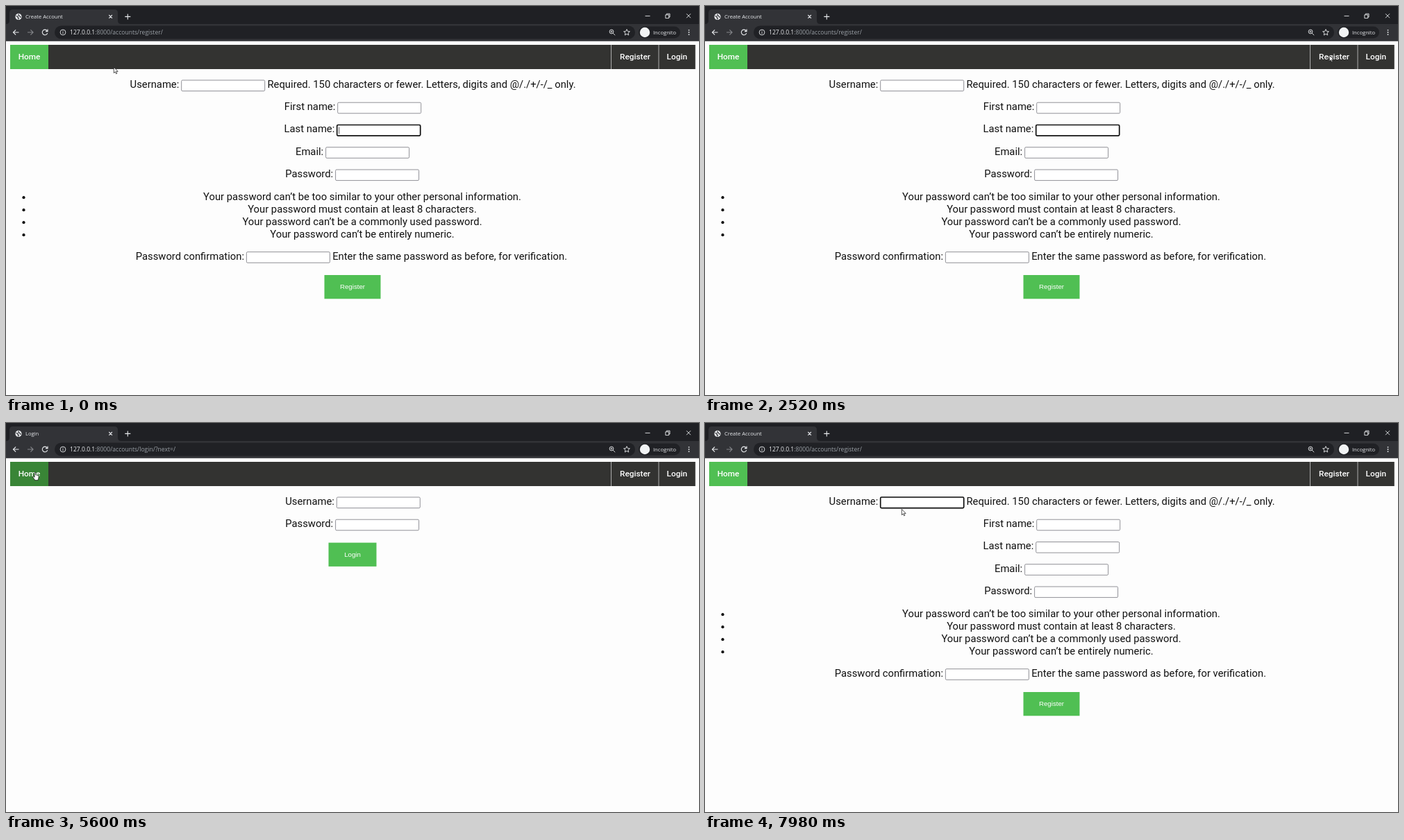
An HTML page that plays this animation: 998x561 px, repeating every 8000 ms.

```html
<!DOCTYPE html>
<html lang="en">
<head>
<meta charset="utf-8">
<title>Create Account</title>
<style>
  html, body { margin: 0; width: 100%; height: 100%; overflow: hidden; background: #fdfdfd; }
  svg { display: block; width: 100vw; height: 100vh; }
  text { white-space: pre; }
  .ui { font: 7.6px "Open Sans", "Noto Sans", sans-serif; fill: #e8eaed; }
  .url { font-size: 8.58px; }
  .body { font: 14.8px Roboto, sans-serif; fill: #111; }
  .nav { font: 500 11.8px Roboto, sans-serif; fill: #fff; text-anchor: middle; }
  .btn { font: 9.67px "Liberation Sans", Arial, sans-serif; fill: #fff; text-anchor: middle; }
  .mid { text-anchor: middle; }
  .end { text-anchor: end; }
  .line { fill: none; stroke: #e8eaed; stroke-width: 1.1; }
  .dim { stroke: #85878b; }
</style>
</head>
<body>
<svg id="stage" viewBox="0 0 998 561" preserveAspectRatio="none">
  <rect width="998" height="561" fill="#fdfdfd"/>

  <!-- browser window -->
  <rect width="998" height="50.5" fill="#1f2024"/>
  <rect y="26" width="998" height="24.5" fill="#323337"/>
  <path d="M0 26q5 0 5-5V10q0-5 5-5H156q5 0 5 5V21q0 5 5 5z" fill="#323337"/>
  <g id="globe">
    <circle r="4.6" fill="#e8eaed"/>
    <path d="M-3.5-1.2L-.6.2-1 1.6.4 2.6-.6 4M.2-3.9L-.2-2 1.6-1.2 2.6.6 3.8.4" fill="none" stroke="#323337" stroke-width="1.2"/>
  </g>
  <text id="title" class="ui" x="28" y="18"></text>
  <path class="line" d="M148.3 13l4.6 4.6m0-4.6l-4.6 4.6M171.3 15.4h8m-4-4v8"/>
  <path class="line" d="M920.5 14.4h7M949.8 12.8h4.8v4.8h-4.8zM951.2 12.6v-1.4H956v4.8h-1.2M980 11.2l6 6m0-6l-6 6" style="stroke-width:.9"/>
  <path class="line" d="M18.5 38h-8m3.6-3.7L10.4 38l3.7 3.7"/>
  <path class="line dim" d="M31 38h8m-3.6-3.7L39.1 38l-3.7 3.7"/>
  <path class="line" d="M59.2 35.7a3.8 3.8 0 1 0 .5 3.4M60 33.6v3h-3"/>
  <rect x="70" y="28.5" width="836" height="19" rx="9.5" fill="#202125"/>
  <g class="line" style="stroke-width:.9">
    <circle cx="82" cy="38" r="3.9"/>
    <path d="M82 37.4v2.7M82 35.7v1"/>
    <circle cx="872" cy="37" r="2.9"/>
    <path d="M874.2 39.2l3 3M870.6 37h2.8M872 35.6v2.8"/>
    <path d="M894 33.6l1.3 2.9 3.1.3-2.4 2.1.7 3.1-2.7-1.6-2.7 1.6.7-3.1-2.4-2.1 3.1-.3z"/>
  </g>
  <text class="ui url" x="92" y="41">127.0.0.1<tspan id="path" fill="#9aa0a6"></tspan></text>
  <rect x="911" y="29.5" width="60" height="17" rx="8.5" fill="#202125"/>
  <circle cx="920" cy="38" r="7.2" fill="#f1f3f4"/>
  <text class="ui" x="932" y="40.8">Incognito</text>
  <g fill="#e8eaed"><circle cx="983.5" cy="34.8" r=".9"/><circle cx="983.5" cy="38" r=".9"/><circle cx="983.5" cy="41.2" r=".9"/></g>

  <!-- navigation bar -->
  <rect x="6" y="56" width="986.5" height="35" fill="#333331"/>
  <g id="nav"></g>
  <path d="M871.5 56v35M940 56v35" stroke="#bbb" stroke-width=".9"/>
  <text class="nav" x="33.5" y="76.8">Home</text>
  <text class="nav" x="906" y="76.8">Register</text>
  <text class="nav" x="966.3" y="76.8">Login</text>

  <g id="register"></g>
  <g id="login"></g>
  <g id="focus">
    <rect width="120" height="15.6" rx="1.5" fill="#fff" stroke="#111" stroke-width="1.7"/>
    <path id="caret" d="M3 3v10" stroke="#333" stroke-width=".8"/>
  </g>

  <g id="pointer" stroke="#111" stroke-linejoin="round" fill="#fff">
    <path id="arrow" d="M.3.3V8.6L2.2 6.9 3.5 9.8 4.9 9.2 3.6 6.4H6.2z" stroke-width=".7"/>
    <path id="hand" d="M-.9.9Q-.9 0 0 0T.9.9V4.1Q2 3.4 2.5 4.4 3.5 3.8 3.9 4.8 5 4.5 5 5.6V8Q5 9 4.2 10.2V11.6H-.8V10.4Q-2 9.3-3.3 6.9-3.5 5.8-2.4 5.9L-.9 7.3z" stroke-width=".7"/>
  </g>
</svg>
<script>
const LOOP = 8000;
const $ = id => document.getElementById(id);

function add(parent, tag, attrs, text) {
  const el = document.createElementNS("http://www.w3.org/2000/svg", tag);
  for (const k in attrs) el.setAttribute(k, attrs[k]);
  if (text) el.textContent = text;
  return $(parent).appendChild(el);
}

function field(page, label, x, y, help) {
  add(page, "text", { class: "body end", x: x - 3.4, y: y + 10.9 }, label);
  add(page, "rect", { x, y, width: 120, height: 15.6, rx: 1.5, fill: "#fff", stroke: "#85858c", "stroke-width": .9 });
  if (help) add(page, "text", { class: "body", x: x + 123.8, y: y + 10.9 }, help);
}

function button(page, label, y, w) {
  add(page, "rect", { x: 499 - w / 2, y, width: w, height: 34.3, fill: "#50bf53" });
  add(page, "text", { class: "btn", x: 499, y: y + 20.4 }, label);
}

field("register", "Username:", 252.7, 107, "Required. 150 characters or fewer. Letters, digits and @/./+/-/_ only.");
field("register", "First name:", 477.7, 139.2);
field("register", "Last name:", 476.7, 171.5);
field("register", "Email:", 460.6, 203.7);
field("register", "Password:", 474.6, 236);
["Your password can’t be too similar to your other personal information.",
 "Your password must contain at least 8 characters.",
 "Your password can’t be a commonly used password.",
 "Your password can’t be entirely numeric."].forEach((s, i) => {
  const y = 279.8 + i * 18;
  add("register", "circle", { cx: 25.5, cy: y - 3.6, r: 2.1, fill: "#111" });
  add("register", "text", { class: "body mid", x: 513, y }, s);
});
field("register", "Password confirmation:", 346.4, 354.7, "Enter the same password as before, for verification.");
button("register", "Register", 388, 81);

field("login", "Username:", 476.3, 107);
field("login", "Password:", 474.6, 139.2);
button("login", "Login", 172.6, 69);

const links = [
  { x: 6, w: 55, base: "#50bf53", over: "#398536" },
  { x: 872, w: 68, base: "#333331", over: "#111110" },
  { x: 940.5, w: 52, base: "#333331", over: "#111110" }
];
for (const l of links) l.el = add("nav", "rect", { x: l.x, y: 56, width: l.w, height: 35 });

// time, x, y of the pointer tip
const track = [
  [0, 155, 88], [100, 155, 88], [380, 158, 104], [540, 158, 104], [1020, 167, 177], [1480, 167, 177],
  [2400, 885, 122], [2520, 899, 71], [2700, 906, 74], [2900, 906, 74], [3150, 964, 74], [3750, 964, 74],
  [4700, 130, 94], [4900, 66, 86], [5060, 42, 71], [5700, 42, 71], [6050, 400, 215], [6350, 840, 140],
  [6560, 913, 78], [7140, 913, 78], [7660, 503, 200], [7960, 283, 124], [LOOP, 283, 124]
];

// slope at a key: zero at rests and turning points
function slope(i, c) {
  const a = track[i - 1], b = track[i], d = track[i + 1];
  if (!a || !d || (b[c] - a[c]) * (d[c] - b[c]) <= 0) return 0;
  return (d[c] - a[c]) / (d[0] - a[0]);
}

function pos(t) {
  let i = 0;
  while (i < track.length - 2 && t >= track[i + 1][0]) i++;
  const a = track[i], b = track[i + 1], d = b[0] - a[0], u = (t - a[0]) / d, v = 1 - u;
  return [1, 2].map(c =>
    a[c] * (1 + 2 * u) * v * v + b[c] * u * u * (3 - 2 * u) +
    d * u * v * (slope(i, c) * v - slope(i + 1, c) * u));
}

const show = (id, on) => $(id).setAttribute("visibility", on ? "visible" : "hidden");
const place = (id, x, y, s = 1) => $(id).setAttribute("transform", `translate(${x} ${y}) scale(${s})`);

function draw(t) {
  const login = t >= 5320 && t < 7060;
  const late = t >= 7060;
  const toLogin = t >= 5260 && t < 6920;
  const loading = (t >= 5260 && t < 5320) || (t >= 6920 && t < 7060);

  show("register", !login);
  show("login", login);
  $("title").textContent = toLogin ? "Login" : "Create Account";
  $("path").textContent = ":8000/accounts/" + (toLogin ? "login/?next=/" : "register/");
  place("globe", 18, 15.4, loading ? .62 : 1);

  show("focus", !login);
  place("focus", late ? 252.7 : 476.7, late ? 107 : 171.5);
  const blink = (t - (late ? 7060 : 610) + 1060) % 1060;
  show("caret", !login && blink < 530);

  const [x, y] = pos(t);
  const [hx, hy] = pos(Math.max(0, t - 80));
  let over = false;
  for (const l of links) {
    const on = hx >= l.x && hx < l.x + l.w && hy >= 56 && hy < 91;
    l.el.setAttribute("fill", on ? l.over : l.base);
    over = over || on;
  }
  place("pointer", x, y);
  show("arrow", !over);
  show("hand", over);
}

const start = performance.now();
function tick() {
  draw((performance.now() - start) % LOOP);
  requestAnimationFrame(tick);
}
tick();
</script>
</body>
</html>
```
